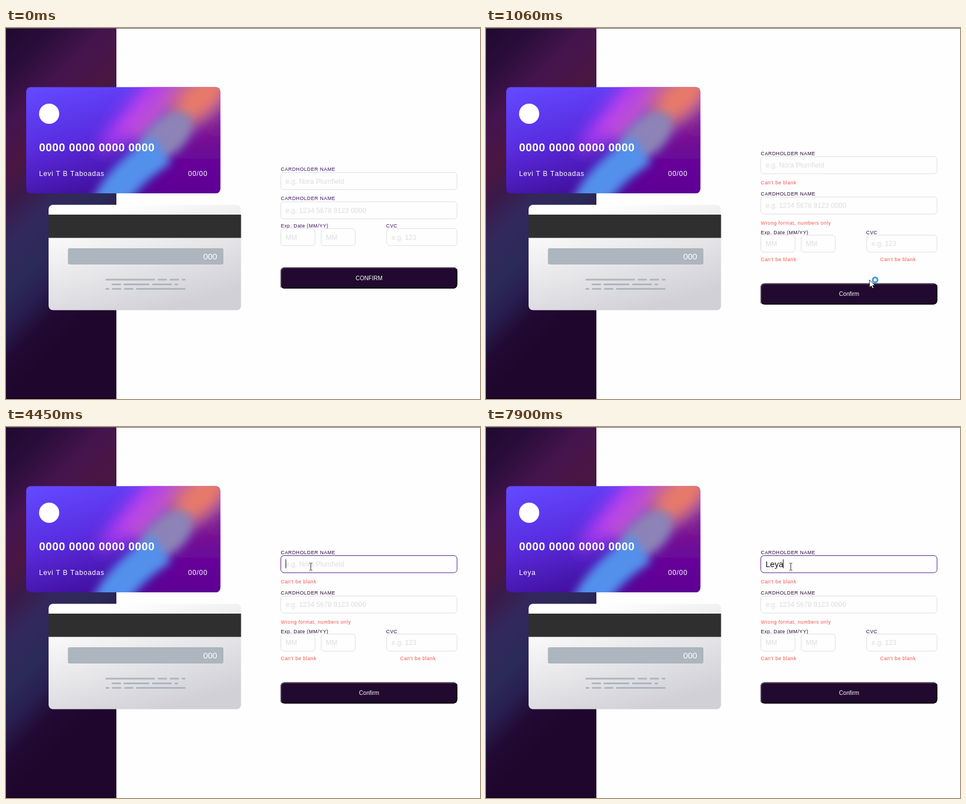
Animation of 846x662 px, one loop 8000 ms. Source, as an HTML page:

```html
<!DOCTYPE html>
<html lang="en">
<head>
<meta charset="utf-8">
<title>Card form</title>
<style>
html, body { margin: 0; width: 100%; height: 100%; overflow: hidden; background: #fefefe; }
svg { display: block; width: 846px; height: 662px; font-family: "Liberation Sans", Arial, sans-serif; font-kerning: none; }
.label, .error { font-size: 8.77px; letter-spacing: .56px; }
.label { fill: #21092f; }
.idle .label { fill: #3a1060; }
.error { fill: #f4504a; }
.hint { font-size: 12.32px; fill: #dedddf; }
.field { fill: #fefefe; stroke: #dfdee0; }
.focus .name { stroke: #531b8c; }
.button { font-size: 10.27px; fill: #fff; text-anchor: middle; }
.card { font-size: 12.3px; letter-spacing: .8px; fill: #fff; }
.number { font-size: 20px; font-weight: bold; letter-spacing: .63px; fill: #fff; }
.soft { filter: url(#soft); }
.mid { filter: url(#mid); }
[hidden] { display: none; }
</style>
</head>
<body>
<svg viewBox="0 0 846 662">
  <defs>
    <linearGradient id="night" gradientUnits="userSpaceOnUse" x1="0" y1="0" x2="430" y2="430">
      <stop offset="0" stop-color="#1f0a2e"/>
      <stop offset=".1" stop-color="#2a0d3a"/>
      <stop offset=".21" stop-color="#45144f"/>
      <stop offset=".31" stop-color="#4a1641"/>
      <stop offset=".37" stop-color="#3a1a4a"/>
      <stop offset=".45" stop-color="#33285c"/>
      <stop offset=".55" stop-color="#2b2a58"/>
      <stop offset=".62" stop-color="#281f50"/>
      <stop offset=".69" stop-color="#210a33"/>
      <stop offset=".77" stop-color="#1f062c"/>
    </linearGradient>
    <linearGradient id="violet" gradientUnits="userSpaceOnUse" x1="60" y1="105" x2="110" y2="300">
      <stop offset="0" stop-color="#6349ff"/>
      <stop offset=".5" stop-color="#5a2ee2"/>
      <stop offset="1" stop-color="#4410a2"/>
    </linearGradient>
    <linearGradient id="plum" x1="0" y1="0" x2="0" y2="1">
      <stop offset="0" stop-color="#93208a"/>
      <stop offset=".55" stop-color="#66069a"/>
      <stop offset="1" stop-color="#5c0490"/>
    </linearGradient>
    <linearGradient id="silver" gradientUnits="userSpaceOnUse" x1="220" y1="312" x2="275" y2="506">
      <stop offset="0" stop-color="#fff"/>
      <stop offset=".4" stop-color="#ececee"/>
      <stop offset="1" stop-color="#d1d0d6"/>
    </linearGradient>
    <filter id="soft" x="-50%" y="-50%" width="200%" height="200%"><feGaussianBlur stdDeviation="15"/></filter>
    <filter id="mid" x="-50%" y="-50%" width="200%" height="200%"><feGaussianBlur stdDeviation="8"/></filter>
    <clipPath id="front"><rect x="36" y="105.500" width="346.500" height="189.500" rx="8"/></clipPath>
  </defs>

  <rect width="846" height="662" fill="#fefefe"/>
  <rect width="197" height="662" fill="url(#night)"/>
  <rect y="660" width="197" height="2" fill="#150420"/>
  <rect width="846" height="1" fill="#565656"/>

  <g clip-path="url(#front)">
    <rect x="36" y="105" width="347" height="190" fill="url(#violet)"/>
    <path class="soft" d="M400 140V315H225L320 190Z" fill="url(#plum)"/>
    <path class="soft" d="M160 225L180 185L270 70L325 70L235 190Z" fill="#b63cf2"/>
    <path class="soft" d="M225 195L325 80" stroke="#c552d0" stroke-width="34"/>
    <ellipse class="soft" cx="350" cy="120" rx="72" ry="38" transform="rotate(-45 350 120)" fill="#e8796a"/>
    <ellipse class="mid" cx="286" cy="193" rx="56" ry="33" transform="rotate(-42 286 193)" fill="#8d83b6"/>
    <path class="mid" d="M180 320Q205 265 278 217" fill="none" stroke="#5390ec" stroke-width="58"/>
  </g>
  <circle cx="77" cy="153" r="18" fill="#fff"/>
  <text class="number" x="59" y="220">0000 0000 0000 0000</text>
  <text class="card" id="holder" x="59" y="263.500"></text>
  <text class="card" x="325" y="263.500">00/00</text>

  <rect x="76" y="315.500" width="343.500" height="188" rx="8" fill="url(#silver)"/>
  <rect x="76" y="333" width="343.500" height="41.500" fill="#2f2f2f"/>
  <rect x="110.500" y="393" width="277.500" height="29" rx="3" fill="#adb5be"/>
  <text x="352" y="413" font-size="14.900" fill="#fff">000</text>
  <path stroke="#adb5be" stroke-width="3" stroke-linecap="round" d="
    M179 449H264.500M272 449H286M293.500 449H307.500M315 449H319
    M190 457.500H204M211 457.500H254.500M262 457.500H294.500M302 457.500H306
    M179 465.500H183M190.500 465.500H204.500M212 465.500H226M233.500 465.500H319"/>

  <g id="idle" class="idle"></g>
  <g id="failed"></g>
  <text id="typed" x="499" y="249.500" font-size="14.600" fill="#111"></text>
  <rect id="caret" y="236" width="1" height="16" fill="#111"/>

  <circle id="halo" r="9.500" fill="#fff000" fill-opacity=".5"/>
  <g id="pointer">
    <path id="arrow" d="M0 0V13.500L3.200 10.500L5.400 15.300L7.600 14.300L5.500 9.700H9.700Z" fill="#fff" stroke="#000" stroke-width=".8"/>
    <circle id="busy" cx="10" cy="0" r="4.300" fill="#fff" stroke="#469fdc" stroke-width="3.200"/>
    <path id="beam" d="M-2.500 -6H-.5M.5 -6H2.500M0 -5.500V6M-2.500 6.500H-.5M.5 6.500H2.500" fill="none" stroke="#222"/>
  </g>
</svg>
<script>
const $ = id => document.getElementById(id);
const HOLDER = 'Levi T B Taboadas';

const text = (kind, x, y, s) => `<text class="${kind}" x="${x}" y="${y}">${s}</text>`;
const field = (x, y, w, hint, name = '') =>
  `<rect class="field ${name}" x="${x}" y="${y}" width="${w}" height="30.5" rx="5.5"/>` +
  text(`hint ${name && 'name-hint'}`, x + 8.5, y + 19.7, hint);

const button = (y, s) =>
  `<rect x="490" y="${y}" width="315.500" height="38" rx="7" fill="#21092f"/>
   <path class="lit" d="M491 ${y + 36}V${y + 8}Q491 ${y + 1} 498 ${y + 1}H802" fill="none" stroke="#56505a" stroke-width="1.600"/>
   <path class="dim" d="M493 ${y + 36}Q495 ${y + 37} 498 ${y + 37}H797.500Q804.500 ${y + 37} 804.500 ${y + 30}V${y + 3}" fill="none" stroke="#000" stroke-width="1.600"/>` +
  text('button', 648, y + 22.5, s);

// Tops of the three field rows and of the button
function form(rows, buttonY, caption, failed) {
  const [a, b, c] = rows;
  const errors = failed
    ? text('error', 490.5, a + 49, "Can't be blank") +
      text('error', 490.5, b + 49, 'Wrong format, numbers only') +
      text('error', 490.5, c + 46, "Can't be blank") +
      text('error', 703.5, c + 46, "Can't be blank")
    : '';
  return text('label', 490.5, a - 3, 'CARDHOLDER NAME') +
    text('label', 490.5, b - 3, 'CARDHOLDER NAME') +
    text('label', 490.5, c - 1.5, 'Exp. Date (MM/YY)') +
    text('label', 678.5, c - 1.5, 'CVC') +
    field(490.5, a, 314.5, 'e.g. Nora Plumfield', 'name') +
    field(490.5, b, 314.5, 'e.g. 1234 5678 9123 0000') +
    field(490.5, c, 61, 'MM') + field(562.5, c, 61, 'MM') +
    field(679.5, c, 125.5, 'e.g. 123') +
    errors + button(buttonY, caption);
}
$('idle').innerHTML = form([257.8, 310, 357.8], 427, 'CONFIRM', false);
$('failed').innerHTML = form([229.5, 301.5, 369.5], 455.5, 'Confirm', true);
const nameHint = $('failed').querySelector('.name-hint');
const lit = $('idle').querySelector('.lit'), dim = $('idle').querySelector('.dim');

// time, typed text, text on the card, caret x (0 = off)
const typing = [
  [0, '', '', 0], [3370, '', '', 499], [3910, '', '', 0], [4450, '', '', 499],
  [4640, 'J', 'J', 506], [4970, 'Jy', 'J', 513], [5040, 'Jy', 'Jy', 513], [5500, 'Jy', 'Jy', 0],
  [5700, 'J', 'J', 0], [5830, '', 'J', 0], [5900, '', '', 0],
  [6040, '', '', 499], [6570, '', '', 0],
  [6840, 'L', 'L', 506], [7390, 'L', 'L', 0],
  [7450, 'Le', 'L', 514], [7520, 'Le', 'Le', 514],
  [7640, 'Ley', 'Le', 522], [7700, 'Ley', 'Ley', 522],
  [7840, 'Leya', 'Ley', 530], [7900, 'Leya', 'Leya', 530]
];

const STEP = 66.7;
const show = (el, on) => el.toggleAttribute('hidden', !on);
const mix = (a, b, p) => a + (b - a) * p;
const progress = (t, start, steps) =>
  Math.min(1, Math.max(0, Math.floor((t - start + 2) / STEP) / steps));

function pointerAt(t) {
  if (t < 2770) {
    const p = 1 - (1 - progress(t, 320, 9)) ** 2;
    return [mix(823, 684.5, p), mix(641, 449.5, p)];
  }
  const p = progress(t, 2770, 8), e = p * p * (3 - 2 * p);
  return [mix(669, 544, e), mix(444, 249, e)];
}

function draw(t) {
  const failed = t >= 1060, pressed = t >= 990 && t < 1060;
  show($('idle'), !failed);
  show($('failed'), failed);
  $('failed').classList.toggle('focus', t >= 3370);
  lit.setAttribute('stroke', pressed ? '#000' : '#56505a');
  dim.setAttribute('stroke', pressed ? '#56505a' : '#000');

  const [, typed, holder, caret] = typing.findLast(s => s[0] <= t);
  $('typed').textContent = typed;
  $('holder').textContent = holder || HOLDER;
  show(nameHint, !typed);
  show($('caret'), caret);
  $('caret').setAttribute('x', caret);

  const [x, y] = pointerAt(t);
  const beam = t > 2770 && y < 260;
  $('pointer').setAttribute('transform', `translate(${x} ${y})`);
  show($('pointer'), t >= 320);
  show($('arrow'), !beam);
  show($('beam'), beam);
  show($('busy'), t >= 1060 && t < 1120);
  $('halo').setAttribute('cx', x - .5);
  $('halo').setAttribute('cy', y + .5);
  show($('halo'), pressed || (t >= 3370 && t < 3440));
}

const start = performance.now();
function tick() {
  draw((performance.now() - start) % 8000);
  requestAnimationFrame(tick);
}
tick();
</script>
</body>
</html>
```
